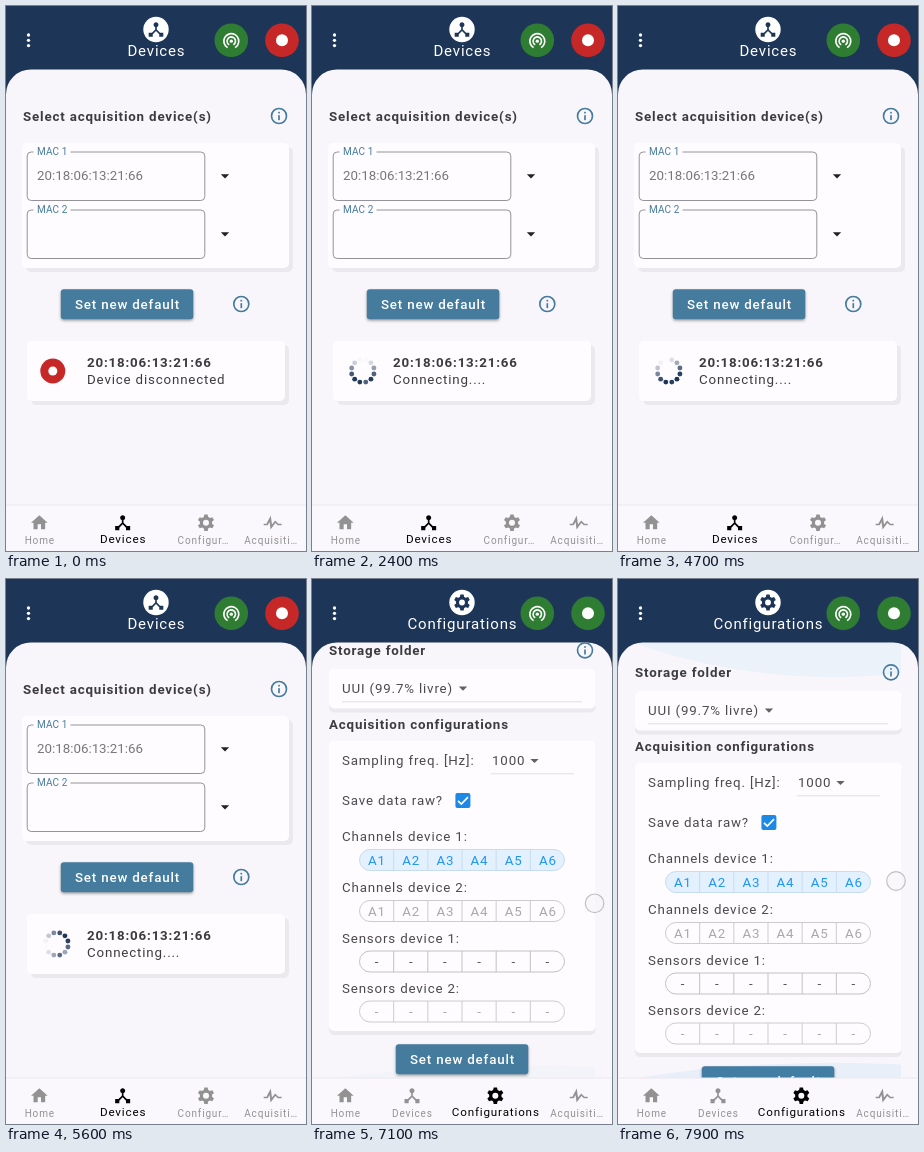
An HTML page with a canvas for the animation above (8 s loop, 300 by 545 pixels).

```html
<!DOCTYPE html>
<html lang="en">
<head>
<meta charset="utf-8">
<title>Device setup</title>
<style>
  html, body { margin: 0; width: 100%; height: 100%; overflow: hidden; background: #1d3557; }
  canvas { display: block; width: 300px; height: 545px; }
</style>
</head>
<body>
<canvas id="stage"></canvas>
<script>
const W = 300, H = 545, LOOP = 8000, STEP = 100;
const CONNECT = 700, CONNECTED = 5900, NAVIGATE = 6200, DRAG = 6900, TURN = 7400;
const NAVY = '#1d3557', BLUE = '#457b9d', BODY = '#f8f6fa', CARD = '#fefcff', SHADE = '#ebe9ee';
const GREEN = '#2e7d32', RED = '#c62828', GRAY = '#929296', SKY = '#2196f3';
const INK = '#3c3c40', SOFT_INK = '#4a4a4e', PALE = '#cdcbd0', RULE = '#e0dee3';
const TAU = Math.PI * 2, SPACING = 0.83, MAX_SCROLL = 22;

const canvas = document.getElementById('stage');
const ctx = canvas.getContext('2d');
const dpr = window.devicePixelRatio || 1;
canvas.width = W * dpr;
canvas.height = H * dpr;

const HOME = new Path2D('M10 20v-6h4v6h5v-8h3L12 3 2 12h3v8z');
const HUB = new Path2D('M17 16l-4-4V8.82C14.16 8.4 15 7.3 15 6c0-1.66-1.34-3-3-3S9 4.34 9 6' +
  'c0 1.3.84 2.4 2 2.82V12l-4 4H3v5h5v-3.05l4-4.2 4 4.2V21h5v-5h-4z');
const PULSE = new Path2D('M3 13h2.8l4.3-8.2 1.2 9 3.2-4.1 3.3 3.3H21v1.6h-3.8l-2.5-2.3-4.8 6.4-1-7.4L7 14.6H3z');

const clamp = (v, a = 0, b = 1) => Math.min(b, Math.max(a, v));
const mix = (a, b, k) => a + (b - a) * k;
const smooth = k => k * k * (3 - 2 * k);
const between = (t, a, b) => clamp((t - a) / (b - a));

// y is the middle of the capitals; baselines sit on whole pixels
function text(str, x, y, { size = 13.33, weight = 400, color = INK, align = 'left', gap = SPACING } = {}) {
  ctx.font = `${weight} ${size}px Roboto, "Open Sans", sans-serif`;
  ctx.letterSpacing = gap + 'px';
  ctx.fillStyle = color;
  ctx.textAlign = 'left';
  const left = align === 'center' ? x - (ctx.measureText(str).width - gap) / 2 : x;
  ctx.fillText(str, left, Math.floor(y + size * 0.355));
}

function box(x, y, w, h, r, fill, stroke, line = 1) {
  ctx.beginPath();
  ctx.roundRect(x, y, w, h, r);
  if (fill) { ctx.fillStyle = fill; ctx.fill(); }
  if (stroke) { ctx.strokeStyle = stroke; ctx.lineWidth = line; ctx.stroke(); }
}

function disc(x, y, r, color) {
  ctx.beginPath();
  ctx.arc(x, y, r, 0, TAU);
  ctx.fillStyle = color;
  ctx.fill();
}

function line(x1, y1, x2, y2, color, width = 1) {
  ctx.beginPath();
  ctx.moveTo(x1, y1);
  ctx.lineTo(x2, y2);
  ctx.strokeStyle = color;
  ctx.lineWidth = width;
  ctx.stroke();
}

// Runs draw() in a 24-unit icon grid centred at x, y
function icon(x, y, size, color, draw) {
  ctx.save();
  ctx.translate(x, y);
  ctx.scale(size / 24, size / 24);
  ctx.translate(-12, -12);
  ctx.fillStyle = ctx.strokeStyle = color;
  draw();
  ctx.restore();
}

const home = () => ctx.fill(HOME);
const hub = () => ctx.fill(HUB);
const pulse = () => ctx.fill(PULSE);

function gear() {
  ctx.translate(12, 12);
  ctx.lineWidth = 3.8;
  ctx.beginPath();
  ctx.arc(0, 0, 5.5, 0, TAU);
  ctx.stroke();
  for (let i = 0; i < 6; i++) {
    ctx.beginPath();
    ctx.moveTo(-2.8, -6);
    ctx.lineTo(-2, -9.9);
    ctx.lineTo(2, -9.9);
    ctx.lineTo(2.8, -6);
    ctx.fill();
    ctx.rotate(TAU / 6);
  }
}

function signal() {
  ctx.lineWidth = 2;
  for (const r of [5, 9]) {
    ctx.beginPath();
    ctx.arc(12, 13, r, TAU / 3, TAU / 6);
    ctx.stroke();
  }
  disc(12, 13, 2, '#fff');
}

function info(x, y) {
  icon(x, y, 20, BLUE, () => {
    ctx.lineWidth = 2;
    ctx.beginPath();
    ctx.arc(12, 12, 9, 0, TAU);
    ctx.stroke();
    ctx.fillRect(11, 7, 2, 2);
    ctx.fillRect(11, 11, 2, 6);
  });
}

function caret(x, y, color) {
  ctx.beginPath();
  ctx.moveTo(x - 4.2, y - 2.1);
  ctx.lineTo(x + 4.2, y - 2.1);
  ctx.lineTo(x, y + 2.1);
  ctx.fillStyle = color;
  ctx.fill();
}

function card(x, y, w, h, dx) {
  box(x + dx, y + 4, w, h, 5, SHADE);
  box(x, y, w, h, 5, CARD);
}

function button(x, y) {
  ctx.save();
  ctx.shadowColor = 'rgba(0,0,0,.35)';
  ctx.shadowBlur = 3 * dpr;
  ctx.shadowOffsetY = 1.5 * dpr;
  box(x, y, 132.5, 30, 3, BLUE);
  ctx.restore();
  text('Set new default', x + 66.2, y + 15, { weight: 500, color: '#fff', align: 'center' });
}

function header(t) {
  ctx.fillStyle = NAVY;
  ctx.fillRect(0, 0, W, 100);
  for (const y of [29, 34.3, 39.6]) disc(22.5, y, 1.65, '#fff');
  const config = t >= NAVIGATE;
  disc(150, 23.5, 12.7, '#fff');
  icon(150, 23.5, 19.5, NAVY, config ? gear : hub);
  text(config ? 'Configurations' : 'Devices', 150, 45, { size: 15, color: '#fff', align: 'center' });
  disc(225.3, 34.3, 16.8, GREEN);
  icon(225.3, 34.3, 20, '#fff', signal);
  disc(276, 34.3, 16.8, t >= CONNECTED ? GREEN : RED);
  disc(276, 34.3, 6, '#fff');
}

function field(y, label, value) {
  box(21.2, y, 177.6, 48.5, 4, null, '#939397');
  ctx.fillStyle = CARD;
  ctx.fillRect(27.5, y - 1, 37, 2);
  text(label, 31, y, { size: 10, color: BLUE, gap: 0.1 });
  text(value, 31, y + 23.5, { color: '#77777b', gap: 0 });
  caret(219, y + 24.3, '#222');
}

function spinner(t) {
  const phase = t / 1200 + 0.31;
  for (let i = 0; i < 12; i++) {
    const a = (45 + 30 * i) * TAU / 360;
    const shift = i ? 1.2 - i / 10 : 0;
    ctx.globalAlpha = (Math.sin((phase + shift) * TAU) + 1) / 2;
    disc(50.8 + 11.5 * Math.cos(a), 365 + 11.5 * Math.sin(a), 2.45, NAVY);
  }
  ctx.globalAlpha = 1;
}

function devicesPage(t) {
  const mac = '20:18:06:13:21:66';
  text('Select acquisition device(s)', 17, 110.5, { weight: 700 });
  info(273, 110);
  card(16, 137, 267, 125, 4);
  field(146, 'MAC 1', mac);
  field(204, 'MAC 2', '');
  button(54.8, 283.3);
  info(235.3, 298);
  card(21, 335, 258, 60, 4);

  let status = 'Connecting....';
  if (t >= CONNECT && t < CONNECTED) {
    spinner(t);
  } else {
    const on = t >= CONNECTED;
    status = on ? 'Device connected' : 'Device disconnected';
    disc(46.8, 365, 12.5, on ? GREEN : RED);
    disc(46.8, 365, 4.5, '#fff');
  }
  text(mac, 81, 357, { weight: 700 });
  text(status, 81, 374);
}

function pills(y, labels, { color, stroke = PALE, fill = CARD }) {
  const x = 47.5, w = 205, cell = w / 6;
  box(x, y, w, 21, 10.5, fill, stroke);
  labels.forEach((s, i) => {
    if (i) line(x + cell * i, y, x + cell * i, y + 21, stroke);
    text(s, x + cell * (i + 0.5), y + 11.1, { color, align: 'center' });
  });
}

function configPage(scroll) {
  const channels = [1, 2, 3, 4, 5, 6].map(n => 'A' + n);
  const dashes = channels.map(() => '-');
  const title = (s, y) => text(s, 17, y, { weight: 700 });
  const label = (s, y, x = 30) => text(s, x, y, { color: SOFT_INK });
  ctx.save();
  ctx.translate(0, -scroll);
  title('Storage folder', 93.7);
  info(273, 93.3);
  card(17, 112, 266.5, 39.5, 0);
  label('UUI (99.7% livre)', 132);
  caret(151, 131.7, '#626266');
  line(30, 144.8, 270, 144.8, RULE);

  title('Acquisition configurations', 167.7);
  card(17, 183.5, 266.5, 290.5, 0);
  label('Sampling freq. [Hz]:', 204);
  label('1000', 204, 180);
  caret(222.5, 204, '#626266');
  line(179, 216.8, 262, 216.8, RULE);

  label('Save data raw?', 244);
  box(143.4, 236.1, 15, 15, 2, '#1e88e5');
  ctx.beginPath();
  ctx.moveTo(146, 243.8);
  ctx.lineTo(149.3, 247.1);
  ctx.lineTo(156, 240.1);
  ctx.strokeStyle = '#fff';
  ctx.lineWidth = 1.7;
  ctx.stroke();

  label('Channels device 1:', 280);
  pills(292.5, channels, { color: SKY, stroke: '#c8dcef', fill: '#e3f0fd' });
  label('Channels device 2:', 331);
  pills(343.5, channels, { color: '#a9a9ad' });
  label('Sensors device 1:', 381.7);
  pills(394, dashes, { color: '#555', stroke: '#c3c1c6' });
  label('Sensors device 2:', 432);
  pills(444, dashes, { color: '#a9a9ad' });
  button(83.8, 487.3);
  ctx.restore();
}

// Overscroll glow: an arc of a large circle, flattened against one edge
function glow(edge, dir, alpha, scale) {
  if (alpha <= 0) return;
  const left = 15, width = 268, r = width * 1.5, depth = width * 0.201;
  ctx.save();
  ctx.beginPath();
  ctx.rect(left, 63, width, 437);
  ctx.clip();
  ctx.translate(left + width * 0.746, edge);
  ctx.scale(1, dir * scale);
  ctx.globalAlpha = alpha;
  disc(0, depth - r, r, SKY);
  ctx.restore();
}

function touch(x, y, alpha) {
  ctx.globalAlpha = alpha;
  disc(x, y, 9.5, 'rgba(246,245,248,.65)');
  ctx.beginPath();
  ctx.arc(x, y, 9.3, 0, TAU);
  ctx.strokeStyle = 'rgba(160,160,168,.65)';
  ctx.lineWidth = 1.2;
  ctx.stroke();
  ctx.globalAlpha = 1;
}

function fingerAt(t) {
  const up = smooth(between(t, DRAG, TURN)), down = smooth(between(t, TURN, 7900));
  return { x: 284 - 4 * up - 2 * down, y: 375 - 144 * up + 71 * down };
}

function navBar(t) {
  const k = smooth(between(t, NAVIGATE, NAVIGATE + 200));
  const unit = W / 4.5;
  const items = [
    { label: 'Home', draw: home, on: 0 },
    { label: 'Devices', draw: hub, on: 1 - k },
    { label: 'Configurations', short: 'Configur…', draw: gear, on: k },
    { label: 'Acquisition', short: 'Acquisiti…', draw: pulse, on: 0, size: 24 }
  ];
  ctx.fillStyle = '#eceaef';
  ctx.fillRect(0, 498.5, W, 1.5);
  ctx.fillStyle = '#faf8fc';
  ctx.fillRect(0, 499.5, W, H);
  let x = 0;
  for (const { label, short, draw, on, size = 20 } of items) {
    const width = unit * (1 + on / 2), mid = x + width / 2;
    const c = Math.round(mix(146, 0, on)), color = `rgb(${c},${c},${c})`;
    const style = { size: mix(10, 11.67, on), color };
    icon(mid, 516.7, size, color, draw);
    if (short && on < 0.9) text(short, mid - 28.4, 534.6, style);
    else text(label, mid, mix(534.6, 533.3, on), { ...style, align: 'center' });
    x += width;
  }
}

function render(t) {
  ctx.setTransform(dpr, 0, 0, dpr, 0, 0);
  header(t);
  ctx.save();
  ctx.beginPath();
  ctx.roundRect(0, 63.4, W, 500, [25, 25, 0, 0]);
  ctx.clip();
  ctx.fillStyle = BODY;
  ctx.fillRect(0, 63, W, H);
  const finger = fingerAt(t);
  if (t < NAVIGATE) {
    devicesPage(t);
  } else {
    const rising = t <= TURN;
    const travel = rising ? 357 - finger.y : finger.y - 231;
    const moved = clamp(travel, 0, MAX_SCROLL);
    const over = Math.max(0, travel - MAX_SCROLL);
    configPage(Math.round(rising ? moved : MAX_SCROLL - moved));
    if (rising) {
      const pull = clamp(over / 104);
      glow(500, -1, 0.2 * pull, 0.8 * Math.sqrt(pull));
    } else {
      const fade = 1 - between(t, TURN, TURN + 800);
      const pull = clamp(over / 49);
      glow(500, -1, 0.2 * fade, 0.8 * fade);
      glow(63, 1, 0.05 * pull, 0.65 * Math.sqrt(pull));
    }
  }
  ctx.restore();
  navBar(t);
  if (t >= NAVIGATE && t < NAVIGATE + 200) touch(201.5, 527, 0.8 * (1 - between(t, NAVIGATE, NAVIGATE + 200)));
  if (t >= DRAG) touch(finger.x, finger.y, 1);
}

function tick(now) {
  const t = now % LOOP;
  render(Math.floor(t / STEP) * STEP);
  requestAnimationFrame(tick);
}
requestAnimationFrame(tick);
</script>
</body>
</html>
```
